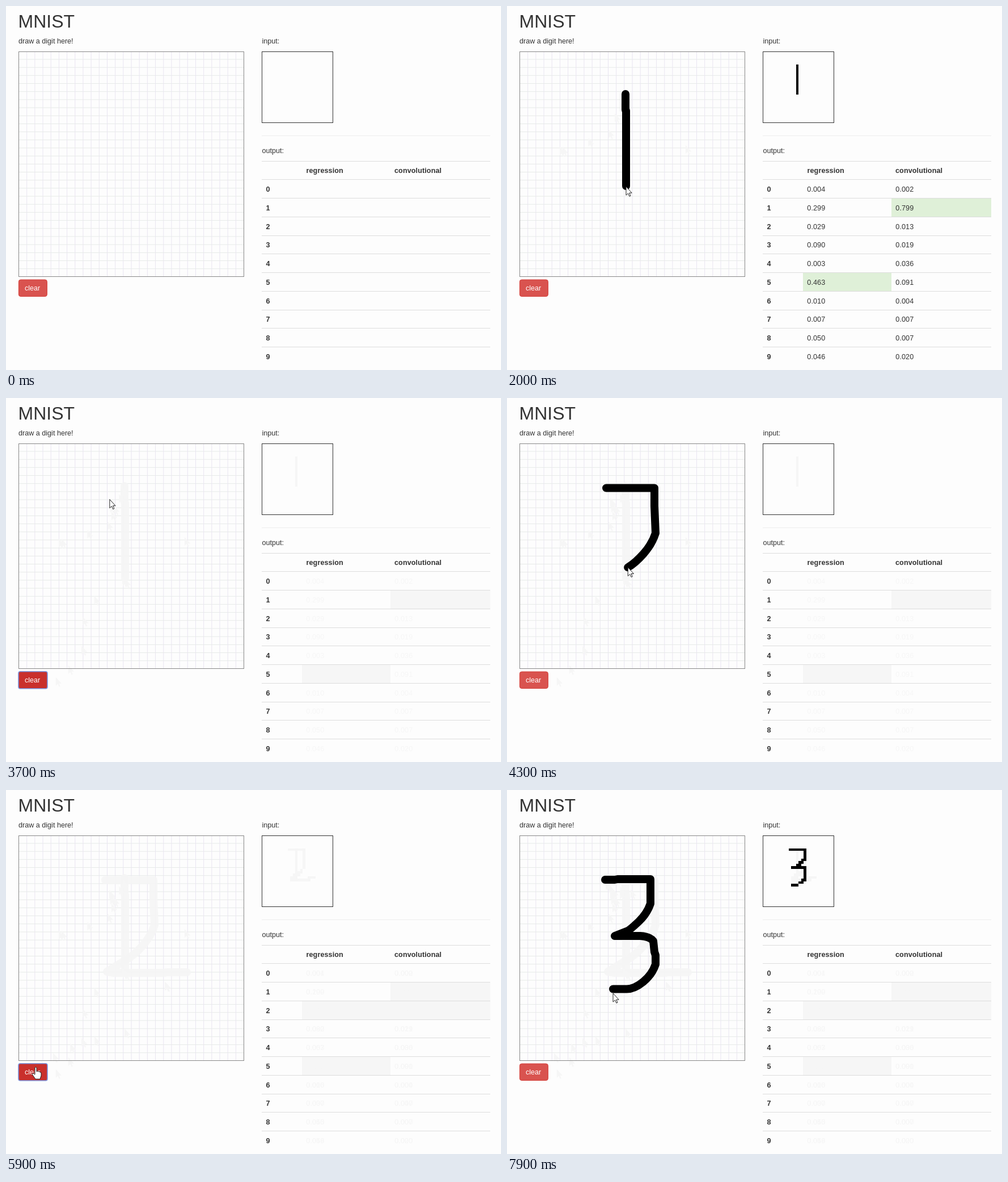
These frames come from a looping animation (873x641 px, 8000 ms). An HTML page:

```html
<!DOCTYPE html>
<html lang="en">
<head>
<meta charset="utf-8">
<title>MNIST</title>
<style>
  html, body { margin: 0; width: 100%; height: 100%; overflow: hidden; background: #fdfdfd; }
  svg { display: block; width: 873px; height: 641px; }
  text { font: 12.6px "Liberation Sans", Arial, sans-serif; fill: #333; }
  .title { font-size: 32px; }
  .bold { font-weight: bold; letter-spacing: .1px; }
  .score { letter-spacing: .08px; }
  .crisp { shape-rendering: crispEdges; }
  .pen { fill: none; stroke: #000; stroke-width: 14; stroke-linecap: round; stroke-linejoin: round; }
  .cell { fill: #dff0d8; }
  .ghost :is(text, rect), .trail { fill: #f6f6f6; }
  .ghost .pen { stroke: #f6f6f6; opacity: .9; }
  .cursor { fill: #fff; stroke: #222; stroke-linejoin: round; }
</style>
</head>
<body>
<svg id="stage" viewBox="0 0 873 641"></svg>
<script>
const NS = "http://www.w3.org/2000/svg";
const LOOP = 8000, STEP = 100;
const CELLS = 28, CELL = 14.18, PIXEL = 4.464;
const ARROW = "M0 0V15.2L3.5 12L5.9 17.2L8 16.2L5.7 11.2H10.2Z";
const HAND = "M5 1Q7-1 8 1V8Q10 6 11 8Q13 7 14 9Q16 8 16 11V15L14 21H6L1 14Q-1 11 2 11L5 13Z";
const stage = document.getElementById("stage");

function add(parent, tag, attrs = {}, text) {
  const el = document.createElementNS(NS, tag);
  for (const k in attrs) el.setAttribute(k, attrs[k]);
  if (text !== undefined) el.textContent = text;
  parent.appendChild(el);
  return el;
}
const group = cls => add(stage, "g", { class: cls });
const label = (parent, x, y, text, cls = "") => add(parent, "text", { x, y, class: cls }, text);
const box = (parent, x, y, width, height, attrs) => add(parent, "rect", { x, y, width, height, ...attrs });
const bar = (parent, x, y, w, h, fill, cls = "") => box(parent, x, y, w, h, { fill, class: cls + " crisp" });
const show = (el, on) => el.setAttribute("visibility", on ? "visible" : "hidden");

// A path the pointer follows between two times
function motion(from, to, d, pen = false) {
  const path = document.createElementNS(NS, "path");
  path.setAttribute("d", d);
  const length = path.getTotalLength();
  const reach = t => {
    const p = Math.min(1, Math.max(0, (t - from) / (to - from)));
    return length * (pen ? p : 1 - (1 - p) ** 2);
  };
  return { from, d, pen, length, reach, point: s => path.getPointAtLength(s) };
}

const digits = [
  {
    pen: motion(1500, 1800, "M209 155V183L210 184V317", true),
    press: 1300, result: 2000, clear: 3300, best: [5, 1],
    scores: ["0.004 0.299 0.029 0.090 0.003 0.463 0.010 0.007 0.050 0.046",
             "0.002 0.799 0.013 0.019 0.036 0.091 0.004 0.007 0.007 0.020"]
  },
  {
    pen: motion(3900, 4600, "M175 158.5H260V190L262 238Q256 257 241 274T212 299L178 320L190 322H278L285 321H319", true),
    press: 3300, result: 4700, clear: 5800, best: [2, 2],
    scores: ["0.001 0.100 0.594 0.082 0.067 0.015 0.006 0.030 0.045 0.059",
             "0.000 0.002 0.937 0.021 0.000 0.000 0.000 0.040 0.000 0.000"]
  },
  {
    pen: motion(6800, 7800, "M173 158H190L195 157H253V200Q247 218 232 232T213 248L190 257H235Q252 258 258 266" +
                            "L260 285L262 291V307Q256 325 240 338T210 350.5H187", true),
    press: 5800, result: 7900, clear: LOOP, best: [], scores: []
  }
];

const motions = [
  motion(200, 300, "M315 245L93 248"),
  motion(500, 1100, "M98 248L178 220L195 176L209 155"),
  motion(2000, 2100, "M210 318L206 316"),
  motion(2400, 3200, "M205 313L175 353L137 344L133 441L93 492L46 488"),
  motion(3500, 3800, "M186 200L183 179L182 176"),
  motion(4800, 4900, "M280 338H281"),
  motion(5000, 5600, "M209 420L134 440L102 450L46 488"),
  motion(6200, 6700, "M218 175L190 178L174 160"),
  motion(7900, 8000, "M187 358H188"),
  ...digits.map(d => d.pen)
].sort((a, b) => a.from - b.from);

const overButton = ({ x, y }) => x > 22 && x < 73 && y > 482 && y < 512;

function pointer(t) {
  const m = motions.filter(m => m.from <= t).pop();
  if (!m) return null;
  // The last press keeps the pointer on the button until the next motion
  const { x, y } = m.point(m.reach(t));
  return { x, y, pen: m.pen, hand: overButton({ x, y }) };
}

const columns = [[522, 156], [678, 176]];
const rowLine = i => Math.round(305.3 + 32.75 * i);
const rowText = i => 327 + 32.75 * i;

function drawPage() {
  const g = group("page");
  label(g, 21.5, 37.6, "MNIST", "title");
  label(g, 22, 66.2, "draw a digit here!");
  label(g, 451.5, 66.2, "input:");
  label(g, 451.5, 259.3, "output:");
  label(g, 529.5, 294, "regression", "bold");
  label(g, 685, 294, "convolutional", "bold");
  for (let i = 0; i < 10; i++) label(g, 458.5, rowText(i), i, "bold");
  bar(g, 451, 228, 403, 1, "#eee");
  for (let i = 1; i < CELLS; i++) {
    box(g, 22 + CELL * i, 81, 1, 395, { fill: "#e9e5f1" });
    box(g, 23, 79.3 + CELL * i, 396, 1, { fill: "#e7eae8" });
  }
}

// The small input shows the grid cells that the pen ran through
function drawPixels(g, pen) {
  const seen = new Set();
  for (let s = 0; s <= pen.length; s += 3) {
    const { x, y } = pen.point(s);
    seen.add(Math.floor((x - 22) / CELL) + CELLS * Math.floor((y - 80) / CELL));
  }
  for (const n of seen)
    bar(g, 452 + PIXEL * (n % CELLS), 80.5 + PIXEL * Math.floor(n / CELLS), PIXEL, PIXEL, "#000");
}

function drawResult(g, { pen, best, scores }) {
  best.forEach((r, c) =>
    bar(g, columns[c][0], rowLine(r) + 1, columns[c][1], rowLine(r + 1) - rowLine(r) - 1, "", "cell"));
  scores.forEach((list, c) => list.split(" ").forEach((s, r) =>
    label(g, columns[c][0] + 7.3, rowText(r), s, "score")));
  drawPixels(g, pen);
}

drawPage();

// Faint marks left behind by earlier contents
for (const d of digits) {
  d.ghost = group("ghost");
  add(d.ghost, "path", { class: "pen", d: d.pen.d });
  drawResult(d.ghost, d);
}
const trails = [];
for (let t = 0; t < LOOP - STEP; t += STEP) {
  const a = pointer(t), b = pointer(t + STEP);
  if (!a || a.pen || a.hand || (a.x === b.x && a.y === b.y)) continue;
  const el = add(stage, "path", { d: ARROW, class: "trail", transform: `translate(${a.x} ${a.y})` });
  trails.push({ el, from: t + STEP });
}

for (const d of digits) {
  d.view = group("result");
  drawResult(d.view, d);
  d.ink = add(stage, "path", { class: "pen", d: d.pen.d });
}

const frame = group("frame");
box(frame, 22.5, 80.5, 397, 396, { fill: "none", stroke: "#888" });
box(frame, 451.5, 80.5, 125, 125, { fill: "none", stroke: "#333" });
for (let i = -1; i < 10; i++) bar(frame, 451, rowLine(i), 403, 1, "#ddd");

const button = box(frame, 22.4, 482, 50, 29.4, { rx: 3.5 });
const ring = box(frame, 22, 481.8, 51, 30, { rx: 3, fill: "none", stroke: "#7d93dc", "stroke-width": 1.6 });
label(frame, 33, 501, "clear").style.fill = "#fff";
const cursor = add(stage, "path", { class: "cursor" });

function render(t) {
  for (const d of digits) {
    show(d.ink, t >= d.pen.from && t < d.clear);
    d.ink.setAttribute("stroke-dasharray", `${d.pen.reach(t)} ${LOOP}`);
    show(d.view, t >= d.result && t < d.clear);
    show(d.ghost, t >= d.clear);
  }
  for (const { el, from } of trails) show(el, t >= from);

  const at = pointer(t);
  const focus = digits.some(d => t >= d.press && t < d.pen.from);
  const dark = focus || (at && at.hand);
  button.setAttribute("fill", dark ? "#c9302c" : "#d9534f");
  button.setAttribute("stroke", dark ? "#ac2925" : "#d43f3a");
  show(ring, focus);

  show(cursor, at);
  if (at) {
    cursor.setAttribute("d", at.hand ? HAND : ARROW);
    cursor.setAttribute("transform", `translate(${at.x} ${at.y})`);
  }
}

let shown = -1;
const start = performance.now();
function tick() {
  const t = Math.floor(((performance.now() - start) % LOOP) / STEP) * STEP;
  if (t !== shown) render(shown = t);
  requestAnimationFrame(tick);
}
tick();
</script>
</body>
</html>
```
